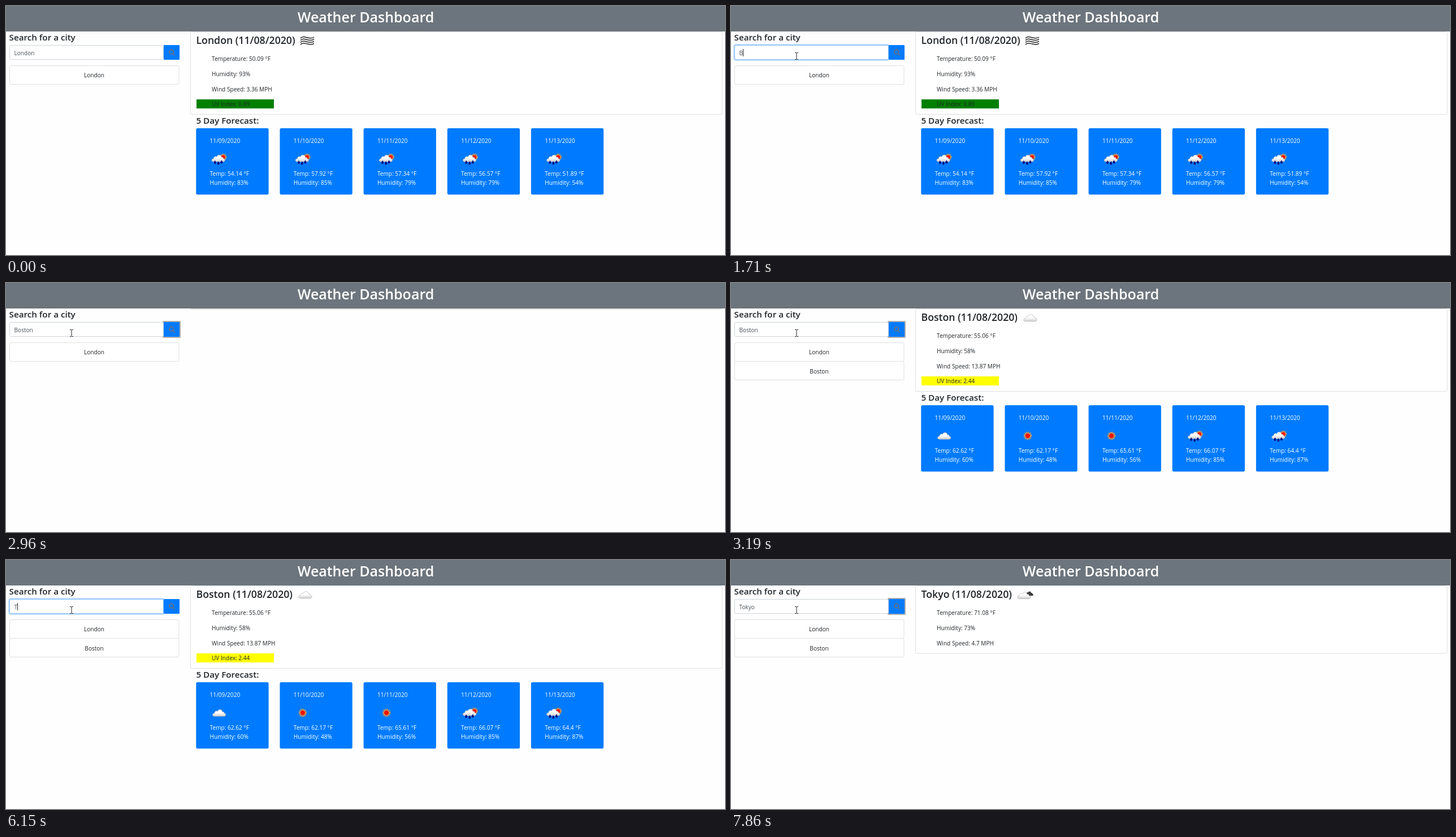
An HTML page for the animation above (8000 ms loop, 1272 by 440 pixels).

```html
<!DOCTYPE html>
<html lang="en">
<head>
<meta charset="utf-8">
<title>Weather Dashboard</title>
<style>
  html, body { margin: 0; width: 100%; height: 100%; overflow: hidden; background: #fefefe; }
  svg { display: block; width: 1272px; height: 440px; }
  text { font: 10.1px "Open Sans", "Noto Sans", sans-serif; fill: #212529; white-space: pre; }
  .h1 { font-size: 25px; font-weight: 600; fill: #fff; }
  .h3 { font-size: 17.7px; font-weight: 600; }
  .h4 { font-size: 15.2px; font-weight: 600; }
  .mid { text-anchor: middle; }
  .day text { fill: #fff; }
  .day rect { fill: #007bff; }
  .box { fill: #fff; stroke: #dfdfdf; }
  #field { fill: #495057; }
  #field.sel { fill: #fff; }
</style>
</head>
<body>
<svg viewBox="0 0 1272 440">
  <defs>
    <linearGradient id="puff" x2="0" y2="1">
      <stop offset=".45" stop-color="#fff"/>
      <stop offset="1" stop-color="#cfcfcf"/>
    </linearGradient>
    <path id="shape" d="M-8 6.2C-12.5 6.2-12.5 1-8 .8C-8-3-4-4-2.5-2.5C-1-7.5 6-6.5 6-1.5C8-2.5 9.5-1 9.3.8C13 1 13 6.2 9 6.2Z"/>
    <use id="cloud" href="#shape" fill="url(#puff)" stroke="#a5a5a5" stroke-width=".6"/>
    <g id="sun">
      <circle r="5" fill="#ffb040"/>
      <circle r="6" fill="none" stroke="#ff9a2a" stroke-width="2.6" stroke-dasharray="1.6 1.54"/>
      <circle r="4.2" fill="#f01400"/>
    </g>
    <path id="drop" d="M0-3.2C.8-1.4 2-.6 2 .9A2 2 0 0 1-2 .9C-2-.6-.8-1.4 0-3.2Z" fill="#06067c"/>
    <g id="rain">
      <use href="#sun" transform="translate(7.5 -3) scale(.85)"/>
      <use href="#cloud" x="-1.5" y="-1"/>
      <use href="#drop" x="-7" y="6"/>
      <use href="#drop" x="-1" y="7.5"/>
      <use href="#drop" x="4.5" y="5.5"/>
    </g>
    <path id="wave" d="M-12 1C-8-3-4-1 0 0S8 2 12-1" fill="none" stroke="#222" stroke-width="1.5"/>
    <g id="fog">
      <use href="#wave" y="-5.5"/><use href="#wave" y="-1.8"/>
      <use href="#wave" y="1.9"/><use href="#wave" y="5.6"/>
    </g>
    <g id="broken">
      <use href="#shape" fill="#3c3c3c" transform="translate(7 -2.2) scale(.65)"/>
      <use href="#cloud" x="-2" y=".8"/>
    </g>
  </defs>

  <rect width="1272" height="45" fill="#6c757d"/>
  <text class="h1 mid" x="636.5" y="29">Weather Dashboard</text>

  <text class="h4" x="5.6" y="61">Search for a city</text>
  <rect id="ring" x="277" y="67" width="32" height="30" rx="1.5" fill="#adadb0"/>
  <rect x="279" y="69" width="28" height="26" rx="1" fill="#007bff"/>
  <path d="M295.6 84.3l3 3M296.4 81a3.7 3.7 0 1 1-7.4 0a3.7 3.7 0 1 1 7.4 0Z" fill="none" stroke="#94694f" stroke-width="1.2"/>
  <rect x="6.5" y="69.5" width="272" height="25" rx="2.2" fill="#fff" stroke="#ced4da"/>
  <g id="glow">
    <rect x="5" y="68" width="275" height="28" rx="3.5" fill="none" stroke="#007bff" stroke-opacity=".25" stroke-width="2"/>
    <rect x="6.5" y="69.5" width="272" height="25" rx="2.2" fill="none" stroke="#80bdff"/>
  </g>
  <rect id="mark" x="14" y="75" height="14.5" fill="#3390ff"/>
  <text id="field" x="14.5" y="87"></text>
  <rect id="caret" y="76" width="1" height="13" fill="#222"/>

  <rect class="box" x="6.5" y="105.5" width="299.5" height="33" rx="2.5"/>
  <text class="mid" x="156" y="126">London</text>
  <g id="recent">
    <rect class="box" x="6.5" y="138.5" width="299.5" height="33" rx="2.5"/>
    <text class="mid" x="156" y="159.5">Boston</text>
  </g>

  <rect id="panel" class="box" x="326.5" y="45.5" width="940.5" rx="2.5"/>
  <g id="views"></g>

  <path id="arrow" d="M.5.5V16l3.6-3.4L6.5 18.3l2.4-1L6.5 11.700h5Z" fill="#fff" stroke="#000" stroke-width=".9"/>
  <path id="beam" d="M113 82.500h2.200l.8.8.8-.8H119M113 94.500h2.200l.8-.8.8.8H119M116 83.300V93.700" fill="none" stroke="#222"/>
</svg>
<script>
const LOOP = 8000;
const $ = id => document.getElementById(id);
const text = (x, y, s, cls = '') => `<text class="${cls}" x="${x}" y="${y}">${s}</text>`;
const icon = (name, x, y) => `<use href="#${name}" x="${x}" y="${y}"/>`;

// days: [icon, temperature, humidity]
const cities = {
  London: { icon: 'fog', iconX: 533, temp: '50.09', hum: 93, wind: '3.36', uv: '0.89', color: '#008000',
    days: [['rain', '54.14', 83], ['rain', '57.92', 85], ['rain', '57.34', 79], ['rain', '56.57', 79], ['rain', '51.89', 54]] },
  Boston: { icon: 'cloud', iconX: 529, temp: '55.06', hum: 58, wind: '13.87', uv: '2.44', color: '#ffff00',
    days: [['cloud', '62.62', 60], ['sun', '62.17', 48], ['sun', '65.61', 56], ['rain', '66.07', 85], ['rain', '64.4', 87]] },
  Tokyo: { icon: 'broken', iconX: 520, temp: '71.08', hum: 73, wind: '4.7', days: [] }
};

const dayCard = ([name, temp, hum], i) =>
  `<g class="day" transform="translate(${336.3 + 148.15 * i} 216)">
    <rect width="128.3" height="117.300" rx="2.700"/>
    ${text(24.3, 26, `11/${String(9 + i).padStart(2, '0')}/2020`)}
    ${icon(name, 40.5, 54)}
    ${text(24.3, 84, `Temp: ${temp} °F`)}
    ${text(24.3, 99.5, `Humidity: ${hum}%`)}
  </g>`;

const cityView = ([name, c]) =>
  `<g id="${name}">
    ${text(336.5, 67, `${name} (11/08/2020)`, 'h3')}
    ${icon(c.icon, c.iconX, 61.5)}
    ${text(364, 97, `Temperature: ${c.temp} °F`)}
    ${text(364, 123.5, `Humidity: ${c.hum}%`)}
    ${text(364, 150.5, `Wind Speed: ${c.wind} MPH`)}
    <g class="more">${c.uv ? `
      <rect x="337" y="165" width="137" height="16" fill="${c.color}"/>
      ${text(364, 177, `UV Index: ${c.uv}`)}
      ${text(336.5, 208, '5 Day Forecast:', 'h4')}
      ${c.days.map(dayCard).join('')}` : ''}
    </g>
  </g>`;

$('views').innerHTML = Object.entries(cities).map(cityView).join('');

// Each track lists [start ms, value]; a value holds until the next one.
const tracks = {
  typed: [[0, 'London'], [1710, 'B'], [1870, 'Bos'], [2030, 'Bost'], [2110, 'Bosto'], [2190, 'Boston'],
    [6150, 'T'], [6230, 'To'], [6690, 'Tok'], [6850, 'Toky'], [6930, 'Tokyo']],
  caret: [[0, 0], [700, 1], [940, 0], [1710, 1], [2500, 0], [4050, 1], [4440, 0], [6150, 1], [7320, 0]],
  selected: [[0, 0], [940, 1], [1710, 0], [4440, 1], [6150, 0]],
  glow: [[0, 0], [700, .25], [780, .8], [860, 1], [2500, .75], [2580, .2], [2680, 0],
    [4050, .25], [4130, .8], [4210, 1], [7320, .5], [7410, 0]],
  ring: [[0, 0], [2500, .25], [2580, .8], [2680, 1], [4050, .75], [4130, .2], [4210, 0], [7320, .5], [7410, 1]],
  city: [[0, 'London'], [2960, ''], [3040, 'Boston'], [7780, ''], [7860, 'Tokyo']],
  full: [[0, 1], [2960, 0], [3190, 1], [7780, 0]],
  recent: [[0, 0], [3190, 1]],
  arrow: [[0, null], [70, [1101, 404]], [150, [590, 238]], [240, [235, 126]],
    [380, [178, 108]], [460, [130, 94]], [540, null]],
  beam: [[0, 0], [540, 1]]
};
const at = (track, t) => track.findLast(([start]) => start <= t)[1];
const show = (el, on) => { el.style.display = on ? '' : 'none'; };

function draw(t) {
  const s = {};
  for (const key in tracks) s[key] = at(tracks[key], t);

  const field = $('field');
  if (field.textContent !== s.typed) field.textContent = s.typed;
  field.classList.toggle('sel', !!s.selected);
  const width = field.getComputedTextLength();
  $('mark').setAttribute('width', width + .8);
  $('caret').setAttribute('x', Math.round(14.3 + width));
  show($('mark'), s.selected);
  show($('caret'), s.caret);
  $('glow').style.opacity = s.glow;
  $('ring').style.opacity = s.ring;
  show($('recent'), s.recent);

  for (const name in cities) {
    show($(name), name === s.city);
    show($(name).querySelector('.more'), s.full);
  }
  $('panel').setAttribute('height', !s.city ? 1 : s.full ? 146 : 119.5);

  show($('arrow'), s.arrow);
  if (s.arrow) $('arrow').setAttribute('transform', `translate(${s.arrow})`);
  show($('beam'), s.beam);
}

const begin = performance.now();
function tick() {
  draw((performance.now() - begin) % LOOP);
  requestAnimationFrame(tick);
}
tick();
</script>
</body>
</html>
```
